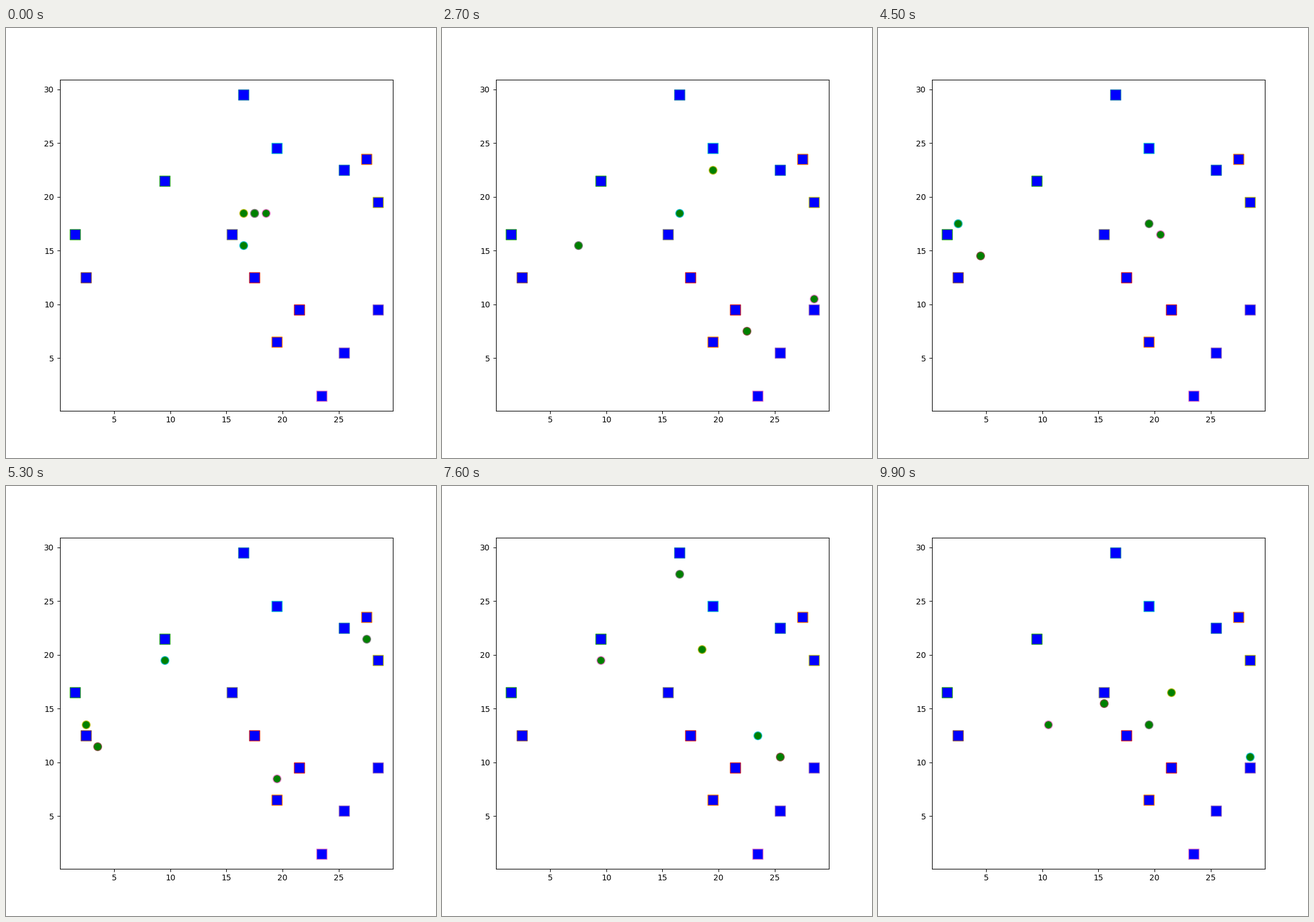
Recreate the animation shown at these times as a matplotlib script. Size 748 by 748 pixels, loop 10000 ms.

```python
import numpy as np
import matplotlib.pyplot as plt
from matplotlib.animation import FuncAnimation

# Grid cells of the stations, in colour-cycle order of their outlines.
STATIONS = [
    (16, 29), (27, 23), (9, 21), (17, 12), (28, 9),
    (2, 12), (23, 1), (15, 16), (28, 19), (19, 24),
    (25, 22), (19, 6), (1, 16), (21, 9), (25, 5),
]

# Every agent finishes its n-th leg at the n-th of these steps.
LEG_ENDS = [0, 16, 37, 53, 62, 76, 99]

# Legs of each agent: cells passed on the way, then the final cell.
ROUTES = [
    [[(17, 18)], [(21, 10)], [(27, 8), (20, 7), (12, 6)],
     [(2, 15), (3, 11)], [(12, 11)], [(25, 10)], [(23, 2), (15, 15)]],
    [[(18, 18)], [(28, 20)], [(28, 10), (25, 18)],
     [(25, 21), (19, 8)], [(11, 7)], [(9, 19)], [(1, 17), (10, 13)]],
    [[(17, 18)], [(4, 13)], [(1, 15), (17, 15)],
     [(27, 21)], [(22, 19)], [(16, 27)], [(16, 28), (18, 13), (19, 13)]],
    [[(16, 18)], [(27, 19)], [(9, 22)],
     [(2, 17), (2, 13)], [(9, 15)], [(18, 20)], [(24, 21), (21, 16)]],
    [[(16, 15)], [(27, 18)], [(6, 18)],
     [(2, 17), (9, 19)], [(17, 20)], [(23, 12)], [(23, 2), (28, 10)]],
]


def walk(a, b, steps):
    """One cell per step, diagonally first, arriving just in time."""
    d = np.subtract(b, a)
    reach = np.abs(d)
    spare = steps - reach.max()
    for k in range(steps):
        yield a + np.sign(d) * np.minimum(max(0, k + 1 - spare), reach)


def trace(route):
    path = [np.array(route[0][0])]
    for end, (*via, goal) in zip(LEG_ENDS[1:], route[1:]):
        for cell in via:
            path += walk(path[-1], cell, np.abs(path[-1] - cell).max())
        path += walk(path[-1], goal, end + 1 - len(path))
    return np.array(path) + 0.5


fig, ax = plt.subplots(figsize=(7.48, 7.48), dpi=100)

for col, row in STATIONS:
    ax.plot(col + 0.5, row + 0.5, "s", markersize=13, markerfacecolor="blue")

paths = [trace(route) for route in ROUTES]
agents = [ax.plot(*path[:1].T, "o", markersize=10, markerfacecolor="green")[0]
          for path in paths]


def update(step):
    for agent, path in zip(agents, paths):
        agent.set_data(*path[step:step + 1].T)
    return agents


def reset():
    return update(0)


anim = FuncAnimation(fig, update, frames=len(paths[0]), init_func=reset,
                     interval=100, repeat=True, repeat_delay=0)
plt.show()
```
